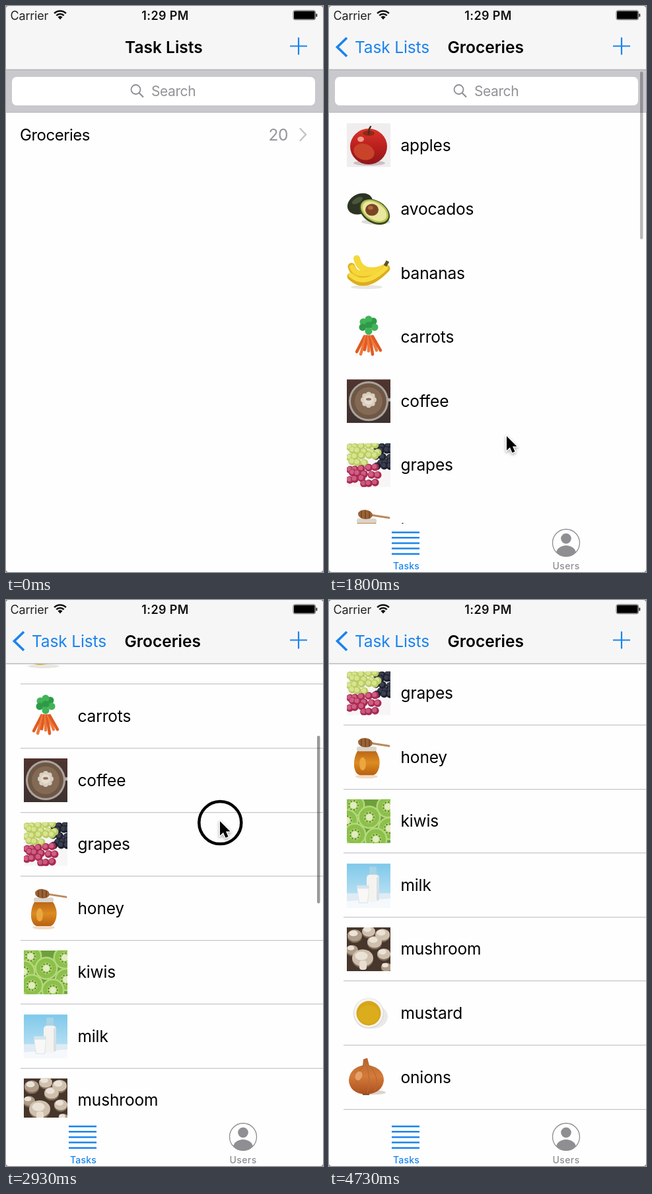
An HTML page with a canvas that plays this animation: 480x854 px, repeating every 4790 ms.

```html
<!DOCTYPE html>
<html lang="en">
<head>
<meta charset="utf-8">
<title>Task lists</title>
<style>
  html, body { margin: 0; width: 100%; height: 100%; overflow: hidden; background: #777; }
  canvas { display: block; width: 100%; height: 100%; border-radius: 4px; }
</style>
</head>
<body>
<canvas id="stage" width="480" height="854"></canvas>
<script>
const c = document.getElementById('stage').getContext('2d');
const W = 480, H = 854, LOOP = 4790, STEP = 200 / 3;
const BLUE = '#1a84ee', GRAY = '#8e8e93', PAPER = '#fefefe';
const ROW = 96.55, FIRST_ROW = 210, TAB_TOP = 781;

// Drawing helpers
function box(x, y, w, h, fill, r = 0) {
  c.fillStyle = fill;
  c.beginPath();
  c.roundRect(x, y, w, h, r);
  c.fill();
}
function oval(x, y, rx, ry, fill, turn = 0) {
  c.fillStyle = fill;
  c.beginPath();
  c.ellipse(x, y, rx, ry, turn, 0, 7);
  c.fill();
}
const dot = (x, y, r, fill) => oval(x, y, r, r, fill);
function shape(d, fill) {
  c.fillStyle = fill;
  c.fill(new Path2D(d));
}
function line(d, color, width, cap = 'butt') {
  c.strokeStyle = color;
  c.lineWidth = width;
  c.lineCap = cap;
  c.stroke(new Path2D(d));
}
function text(str, x, y, { size = 24.5, color = '#000', weight = 400, align = 'left', track = -0.006 } = {}) {
  c.font = `${weight} ${size}px Inter, Roboto, sans-serif`;
  c.letterSpacing = size * track + 'px';
  c.textAlign = align;
  c.fillStyle = color;
  c.fillText(str, x, y);
}
function at(x, y, draw) {
  c.save();
  c.translate(x, y);
  draw();
  c.restore();
}
function faded(alpha, draw) {
  c.save();
  c.globalAlpha = Math.max(0, Math.min(1, alpha));
  draw();
  c.restore();
}
function gradient(y0, y1, ...colors) {
  const g = c.createLinearGradient(0, y0, 0, y1);
  colors.forEach((col, i) => g.addColorStop(i / (colors.length - 1), col));
  return g;
}

// Smooth monotone curve through [time, value] keys
function track(keys, t, col = 1) {
  const last = keys.length - 1;
  if (t <= keys[0][0]) return keys[0][col];
  if (t >= keys[last][0]) return keys[last][col];
  const i = keys.findIndex(k => k[0] > t) - 1;
  const slope = n => n < 0 || n >= last ? 0 : (keys[n + 1][col] - keys[n][col]) / (keys[n + 1][0] - keys[n][0]);
  const tangent = n => {
    const a = slope(n - 1), b = slope(n);
    return a * b > 0 ? 2 * a * b / (a + b) : 0;
  };
  const span = keys[i + 1][0] - keys[i][0], u = (t - keys[i][0]) / span, v = 1 - u;
  return keys[i][col] * v * v * (1 + 2 * u) + keys[i + 1][col] * u * u * (1 + 2 * v)
    + span * u * v * (tangent(i) * v - tangent(i + 1) * u);
}

const POINTER = [[300, 300, 880], [820, 209, 200], [1250, 208, 199], [1800, 269, 649], [2080, 268, 708],
  [2275, 268, 708], [2600, 288, 582], [2933, 324, 334], [3260, 324, 163], [3700, 324, 163], [4150, 300, 880]];
const SCROLL = [[2275, 0], [2600, 126.5], [2933, 324], [3400, 549.5], [3530, 552]];
const BAR_ALPHA = [[1470, 0], [1540, 1], [1700, 1], [1970, 0], [2250, 0], [2330, 1], [3560, 1], [3760, 0]];
const PRESSES = [[840, 960], [2190, 3180]];

// Share of the push transition still to go: a critically damped spring
function pushLeft(t) {
  const w = Math.max(0, t - 976) * 0.01826;
  return (1 + w) * Math.exp(-w);
}

// Each picture fills a 66 x 66 tile
const FOODS = {
  apples() {
    box(0, 0, 66, 66, '#f0edef');
    oval(34, 60, 24, 4, '#cbbfc2');
    oval(33, 35, 28, 27, gradient(8, 62, '#d8352b', '#bb1f1d', '#8e1618'));
    oval(26, 43, 16, 12, '#c8432a', 0.3);
    oval(33, 15, 9, 4, '#8f2a17');
    oval(21, 24, 5, 4, '#ef9c86');
    line('M33 16Q33 9 36 5', '#4d2c1a', 2.5, 'round');
  },
  avocados() {
    oval(44, 52, 22, 4, '#dcdcd8');
    oval(20, 25, 20, 15, '#2c3424', -0.45);
    oval(16, 20, 9, 4, '#4b563d', -0.5);
    oval(42, 37, 25, 17, '#3c491f', 0.55);
    oval(42, 36, 23, 15, '#b9c453', 0.55);
    oval(42, 36, 20, 12.5, '#e9e7a0', 0.55);
    oval(38, 34, 10, 9, '#7c4523');
    oval(36, 31, 4, 3, '#a86c3e');
  },
  bananas() {
    oval(30, 54, 24, 3, '#e8e6df');
    line('M15 11Q22 38 57 25', '#f5d83a', 10, 'round');
    line('M7 23Q14 47 58 25', '#e0b21c', 11, 'round');
    line('M8 24Q16 44 57 24', '#f6d638', 8, 'round');
    line('M6 38Q28 60 60 26', '#dcae1b', 11, 'round');
    line('M6 36Q28 55 59 25', '#f7da40', 7, 'round');
    line('M58 22L62 15', '#57581f', 5);
  },
  carrots() {
    [[25, 10], [40, 9], [33, 6], [24, 18], [42, 18], [33, 15], [33, 24]].forEach(([x, y], i) =>
      dot(x, y, 5.5, i % 2 ? '#2e9a48' : '#41b457'));
    for (let i = 0; i < 7; i++) {
      const x = 15 + i * 6, y = 55 + 4 * Math.sin(i * 2);
      line(`M${27 + i * 2} 32L${x} ${y}`, i % 2 ? '#f0793a' : '#df5b24', 4.5, 'round');
    }
  },
  coffee() {
    box(0, 0, 66, 66, gradient(0, 66, '#50342f', '#3d3230'));
    line('M58 31H66', '#b9b3ae', 5);
    dot(33, 33, 30, '#aaa39d');
    dot(33, 33, 27, '#6f5745');
    dot(33, 33, 21, '#836a54');
    for (let i = 0; i < 8; i++) dot(33 + 8 * Math.cos(i * 0.785), 31 + 8 * Math.sin(i * 0.785), 4, '#d9cfc1');
    dot(33, 31, 7, '#e6ddd0');
    oval(33, 30, 4, 2, '#94775d');
  },
  grapes() {
    box(0, 0, 66, 66, '#f8f5f7');
    const bunch = (x, y, n, cols, a, b) => {
      for (let i = 0; i < n; i++) {
        const row = Math.floor(i / cols);
        const px = x + (i % cols) * 9 + (row % 2) * 4 + 2 * Math.sin(i * 5), py = y + row * 8 + 2 * Math.cos(i * 7);
        dot(px, py, 5.8, a);
        dot(px - 1, py - 1, 3.6, b);
      }
    };
    bunch(46, 4, 15, 3, '#1d1f2b', '#3a3e50');
    bunch(5, 4, 18, 5, '#b9cc62', '#d8e48f');
    bunch(5, 38, 13, 5, '#a92b53', '#cf5f82');
    bunch(26, 59, 3, 3, '#a52850', '#c95a7c');
  },
  honey() {
    oval(30, 62, 17, 3, '#f0dcc6');
    shape('M17 22H43Q52 34 49 48Q46 59 40 60H20Q13 59 11 47Q10 33 17 22Z', gradient(22, 60, '#b96315', '#dc8c22', '#b9600f'));
    oval(24, 43, 5, 10, '#eba63e');
    box(15, 17, 30, 7, '#d9d5cd', 3);
    line('M38 12L64 16', '#b98a5c', 3, 'round');
    oval(28, 11, 11, 7, '#9a6335', 0.1);
    line('M22 6V16M28 5V17M34 6V17', '#71431f', 1.5);
  },
  kiwis() {
    box(0, 0, 66, 66, '#6da03c');
    [[10, 9], [62, 11], [34, 27], [0, 32], [64, 44], [12, 53], [44, 60]].forEach(([x, y]) => {
      dot(x, y, 17.5, '#b4d87c');
      dot(x, y, 15, '#8cc04a');
      dot(x, y, 9, '#a3cf66');
      for (let a = 0; a < 6.2; a += 0.7) dot(x + 7 * Math.cos(a), y + 7 * Math.sin(a), 0.9, '#42551f');
      dot(x, y, 5, '#e3ecc0');
    });
  },
  milk() {
    box(0, 0, 66, 66, gradient(0, 46, '#7fc8ea', '#b4dff2'));
    box(0, 45, 66, 21, '#e1ebf5');
    shape('M0 57L66 53V66H0Z', '#f6f9fc');
    box(34, 5, 11, 14, '#a9d3e6', 2);
    box(30, 17, 19, 41, '#f4f3f0', 5);
    box(45, 20, 4, 36, '#d7e0e5', 2);
    shape('M15 33H34L32 60H18Z', '#d6e4ed');
    shape('M16 38H33L31 59H19Z', '#f9f8f6');
  },
  mushroom() {
    box(0, 0, 66, 66, '#46362b');
    [[12, 12, 11], [54, 11, 11], [33, 6, 10], [8, 34, 9], [42, 22, 11], [56, 40, 10], [60, 60, 8], [24, 46, 16]].forEach(([x, y, r], i) => {
      oval(x, y + 2, r, r * 0.85, '#7d6a57');
      oval(x, y, r, r * 0.8, i % 3 ? '#cfc0ae' : '#b09d89');
      oval(x - 2, y - 3, r * 0.6, r * 0.4, '#ebe2d7');
    });
    box(19, 50, 11, 14, '#e8ddcf', 4);
  },
  mustard() {
    oval(40, 38, 22, 18, '#ebe8e8');
    dot(33, 33, 23, '#d9d6d2');
    dot(33, 32.5, 22, '#f6f5f2');
    dot(33, 33, 18.5, '#d6a518');
    oval(33, 35, 16, 14, '#dbad1c');
  },
  onions() {
    oval(37, 56, 22, 3.5, '#ddd2cb');
    shape('M25 6L31 4L34 15Q56 20 56 38Q54 57 29 59Q4 57 3 38Q4 20 24 15Z', gradient(4, 59, '#b3652c', '#d47b3a', '#a94f1e'));
    line('M27 15Q9 30 18 54M30 15Q37 36 31 57M32 15Q52 32 42 54', '#bd6830', 1.2);
    oval(18, 31, 5, 7, '#e5a36b', 0.4);
    line('M24 59H34', '#7d5130', 2);
  }
};

function searchBar() {
  box(0, 96, W, 65, '#c8c8cd');
  box(0, 160, W, 1, '#b9b9be');
  box(9, 107, 459, 43, '#fff', 7);
  c.strokeStyle = GRAY;
  c.lineWidth = 1.8;
  c.beginPath();
  c.arc(196.5, 126, 7, 0, 7);
  c.stroke();
  line('M201.5 131L208 137.5', GRAY, 2.2);
  text('Search', 220, 135.5, { size: 21, color: '#929297', track: -0.02 });
}

function listsPage(selected, dim) {
  box(0, 0, W, H, PAPER);
  searchBar();
  if (selected) box(0, 161, W, 67, '#d2d2d2');
  text('Groceries', 21, 202.5, { size: 24, track: -0.02 });
  text('20', 427, 202.5, { color: '#96969a', align: 'right', track: -0.02 });
  line('M445 184.5L454 194L445 203.5', '#c2c2c7', 2.3);
  box(0, 0, W, H, `rgba(0,0,0,${0.1 * dim})`);
}

function tabBar() {
  box(0, TAB_TOP, W, H - TAB_TOP, PAPER);
  for (let i = 0; i < 5; i++) box(95, 793 + i * 8.1, 42, 2.5, BLUE);
  text('Tasks', 117, 850, { size: 14, color: BLUE, weight: 500, align: 'center', track: 0.015 });
  c.save();
  c.beginPath();
  c.arc(359, 810, 20.5, 0, 7);
  c.strokeStyle = GRAY;
  c.lineWidth = 1.3;
  c.stroke();
  c.clip();
  dot(359, 803.5, 7.8, GRAY);
  oval(359, 826, 15, 12, GRAY);
  c.restore();
  text('Users', 359, 850, { size: 14, color: GRAY, weight: 500, align: 'center', track: 0.03 });
}

function tasksPage(scroll, barAlpha) {
  box(0, 0, W, H, PAPER);
  at(0, -scroll, searchBar);
  // Hairlines only survive downscaling on every other pixel row
  const hairlines = scroll > 0 && Math.round(scroll / 0.75) % 2 === 0;
  Object.entries(FOODS).forEach(([name, draw], i) => {
    const y = FIRST_ROW + i * ROW - scroll;
    if (y < 40 || y > 830) return;
    at(27, y - 33, () => {
      c.beginPath();
      c.rect(0, 0, 66, 66);
      c.clip();
      draw();
    });
    text(name, 108.5, y + 8.5);
    if (hairlines) box(22, Math.round(y + 47.5), W - 22, 1.3, '#c6c5ca');
  });
  tabBar();
  faded(barAlpha, () => box(471, 99 + scroll * 0.326, 4.5, 253, 'rgba(0,0,0,.4)', 2.2));
}

function statusBar() {
  text('Carrier', 6.5, 20.5, { size: 18, color: '#222', track: -0.01 });
  c.strokeStyle = '#111';
  c.lineWidth = 2.6;
  [12.5, 8].forEach(r => {
    c.beginPath();
    c.arc(82, 20, r, -2.36, -0.78);
    c.stroke();
  });
  shape('M82 20.5L78.4 16.6Q82 13.4 85.6 16.6Z', '#111');
  text('1:29 PM', 241, 20.5, { size: 18, color: '#111', weight: 600, align: 'center', track: 0.02 });
  c.strokeStyle = '#666';
  c.lineWidth = 1;
  c.beginPath();
  c.roundRect(435, 6.8, 33.5, 14, 2.5);
  c.stroke();
  box(436, 7.8, 31.5, 12, '#000', 1.5);
  box(469.3, 11.5, 2, 5, '#333', 1);
}

function navBar(left) {
  const done = 1 - left, titleX = 39 + 141 * left;
  const title = { weight: 600, track: 0 };
  box(0, 0, W, 96, '#f7f6f7');
  box(0, 95.5, W, 1.3, '#aeaeb0');
  statusBar();
  faded(left, () => text('Task Lists', titleX, 70.5, title));
  faded(done, () => {
    text('Task Lists', titleX, 70.5, { color: BLUE });
    text('Groceries', 179.5 + 305 * left, 70.5, title);
  });
  faded((done - 0.89) / 0.11, () => line('M27 48L12.5 62L27 76', BLUE, 3.7));
  line('M430 60.5H456M443 47.5V73.5', BLUE, 2.2);
}

function pointer(t) {
  at(track(POINTER, t, 1), track(POINTER, t, 2), () => {
    if (PRESSES.some(([from, to]) => t >= from && t < to)) {
      c.strokeStyle = '#000';
      c.lineWidth = 4.5;
      c.beginPath();
      c.arc(0.3, 2.3, 32, 0, 7);
      c.stroke();
    }
    c.shadowColor = 'rgba(0,0,0,.4)';
    c.shadowBlur = 4;
    c.shadowOffsetY = 2;
    const arrow = 'M0 0V21.5L5 17L8.5 25L12.5 23.3L9 15.5H15.5Z';
    line(arrow, '#fff', 2.4);
    c.shadowColor = 'transparent';
    shape(arrow, '#000');
  });
}

function render(t) {
  const left = pushLeft(t), offset = W * left;
  at(-144 * (1 - left), 0, () => listsPage(t >= 900, 1 - left));
  if (left < 1) at(offset, 0, () => tasksPage(track(SCROLL, t), track(BAR_ALPHA, t)));
  navBar(left);
  pointer(t);
}

function tick() {
  const t = performance.now() % LOOP;
  render(Math.floor((t + 3.4) / STEP) * STEP);
  requestAnimationFrame(tick);
}
tick();
</script>
</body>
</html>
```
